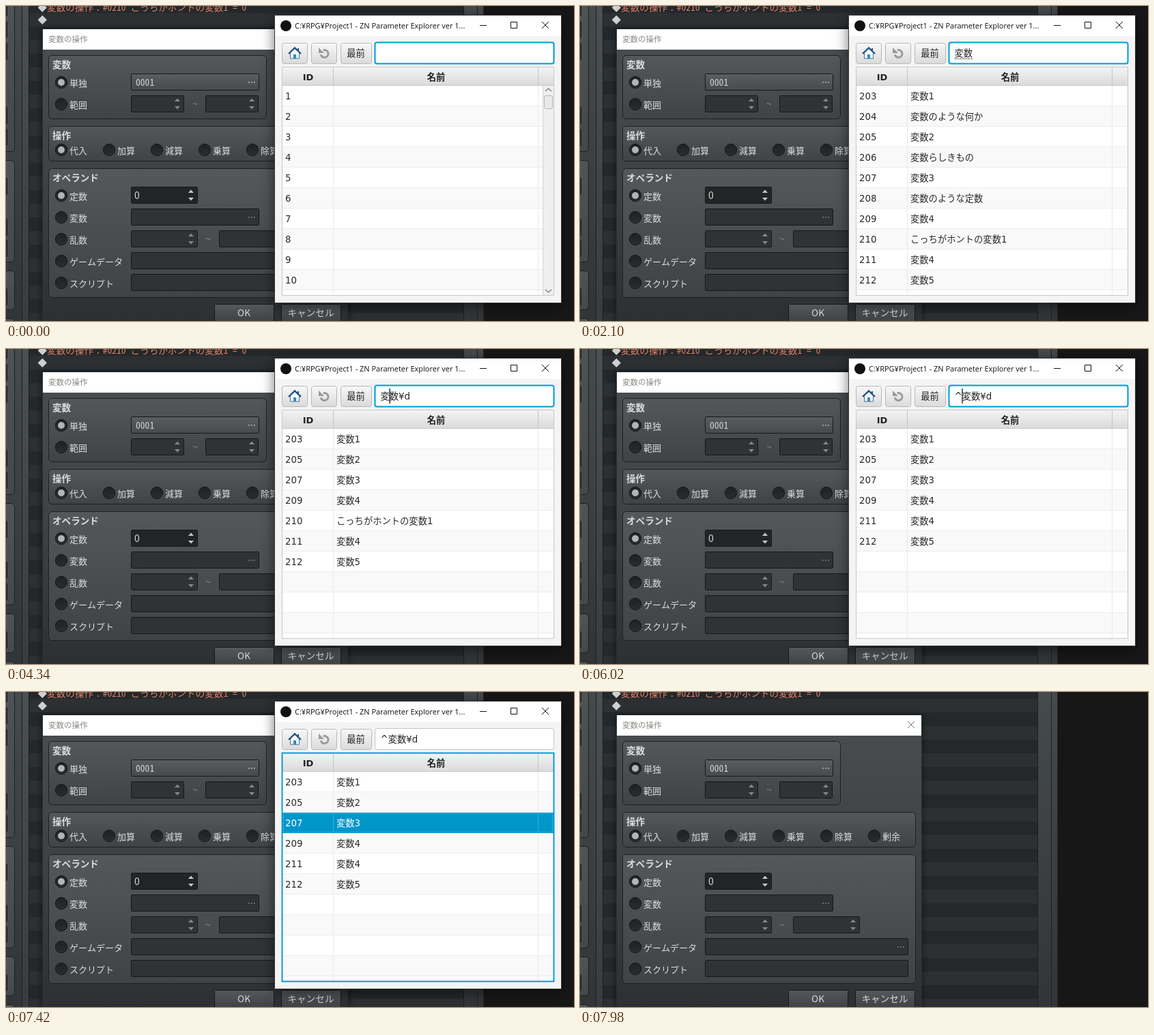
An HTML page with a canvas for the animation above (8 s loop, 832x462 px).

```html
<!DOCTYPE html>
<html lang="ja">
<head>
<meta charset="utf-8">
<style>
html, body { margin: 0; width: 100%; height: 100%; overflow: hidden; background: #171717; }
canvas { display: block; }
</style>
</head>
<body>
<canvas id="stage" width="832" height="462"></canvas>
<script>
const c = document.getElementById('stage').getContext('2d');
const LOOP = 8000;
const CJK = '"Noto Sans CJK JP", sans-serif';
const UI = '"DejaVu Sans", ' + CJK;
const MONO = '"Noto Sans Mono CJK JP", "Noto Sans CJK JP", monospace';
const BLUE = '#039ed3';

// [start, field text, caret index or -1 when hidden]
const typing = [
  [0, '', -1], [140, '', 0], [560, '', -1], [700, '', 0],
  [980, 'へ', 1], [1120, 'へｎ', 2], [1540, 'へｎ', -1],
  [1820, 'へんす', 3], [1960, 'へんすう', 4], [2100, '変数', -1],
  [2380, '変数', 2], [2940, '変数', -1], [3360, '変数', 2],
  [3640, '変数¥', 3], [3780, '変数¥d', 4], [4200, '変数¥d', 3],
  [4340, '変数¥d', 1], [4480, '変数¥d', 0], [4900, '変数¥d', -1],
  [5180, '^変数¥d', 1], [5600, '^変数¥d', -1], [6020, '^変数¥d', 1],
  [6300, '^変数¥d', -1]
];
// [start, focused part, selected row]
const focusing = [
  [0, 'field', -1], [6300, 'table', -1], [6580, 'home', -1],
  [7140, 'table', -1], [7280, 'table', 1], [7420, 'table', 2], [7560, 'table', 5]
];
const names = ['変数1', '変数のような何か', '変数2', '変数らしきもの', '変数3',
  '変数のような定数', '変数4', 'こっちがホントの変数1', '変数4', '変数5'];

const at = (list, t) => list.filter(s => s[0] <= t).pop();

function search(query) {
  if (!query) return names.map((_, i) => [i + 1, '']);
  try {
    const re = new RegExp(query.replace('¥', '\\'));
    return names.map((n, i) => [203 + i, n]).filter(r => re.test(r[1]));
  } catch {
    return [];
  }
}

function grad(y0, y1, ...colors) {
  const g = c.createLinearGradient(0, y0, 0, y1);
  colors.forEach((k, i) => g.addColorStop(i / (colors.length - 1), k));
  return g;
}
function rect(x, y, w, h, fill) {
  c.fillStyle = fill;
  c.fillRect(x, y, w, h);
}
function box(x, y, w, h, r, fill, stroke, width = 1) {
  c.beginPath();
  c.roundRect(x + .5, y + .5, w - 1, h - 1, r);
  if (fill) { c.fillStyle = fill; c.fill(); }
  if (stroke) { c.strokeStyle = stroke; c.lineWidth = width; c.stroke(); }
}
function disc(x, y, r, fill, stroke) {
  c.beginPath();
  c.arc(x, y, r, 0, 7);
  c.fillStyle = fill;
  c.fill();
  if (stroke) { c.strokeStyle = stroke; c.lineWidth = 1; c.stroke(); }
}
function line(color, width, ...p) {
  c.beginPath();
  for (let i = 0; i < p.length; i += 2) c.lineTo(p[i], p[i + 1]);
  c.strokeStyle = color;
  c.lineWidth = width;
  c.stroke();
}
function poly(fill, ...p) {
  c.beginPath();
  for (let i = 0; i < p.length; i += 2) c.lineTo(p[i], p[i + 1]);
  c.fillStyle = fill;
  c.fill();
}
// y is the visual middle of the glyphs
function text(s, x, y, size, color, { font = CJK, weight = 400, align = 'left' } = {}) {
  c.font = `${weight} ${size}px ${font}`;
  c.textAlign = align;
  c.fillStyle = color;
  c.fillText(s, x, y + size * .37);
}

function editor() {
  rect(0, 0, 832, 462, '#171717');
  rect(0, 0, 700, 462, grad(0, 462, '#454a4c', '#3c4042', '#313537'));
  for (const [y, h] of [[-20, 234], [226, 150], [388, 58], [458, 30]])
    box(-10, y, 23, h, 5, grad(y, y + h, '#505456', '#44484a'), '#1c1f21');
  for (const y of [-10, 22, 54, 148, 180, 252, 312, 343, 414])
    box(-10, y, 12, 25, 1, '#33373a', '#17191a');
  rect(23, 0, 1, 462, '#1d2021');
  rect(24, 0, 9, 462, grad(0, 462, '#4b5052', '#383c3e'));
  rect(33, 0, 638, 462, '#1b1e20');
  for (let i = 0; i < 24; i++)
    rect(34, i * 20 - 10, 636, 20, i % 2 ? '#2c3032' : '#24282a');
  rect(690, 0, 1, 462, '#1d2021');
  rect(699, 0, 1, 462, '#222526');
  text('◆', 46.5, 2, 13.6, '#d0d0d0', { font: MONO });
  text('変数の操作：#0210 こっちがホントの変数1 = 0', 60.1, 2, 13.6, '#e0806a', { font: MONO });
  text('◆', 46.5, 20, 13.6, '#d0d0d0', { font: MONO });
}

function group(y, w, h, title) {
  box(62, y, w, h, 5, grad(y, y + h, '#54585a', '#3f4345'), '#1d2021');
  text(title, 68, y + 14, 13.6, '#dcdcdc', { weight: 700 });
}
function radio(x, y, label, on) {
  disc(x, y, 8.7, grad(y - 9, y + 9, '#1e2123', '#2b2e30'), '#17191a');
  if (on) disc(x, y, 5, '#b4b4b4');
  text(label, x + 12, y + 1, 13, '#dcdcdc', { weight: 500 });
}
function entry(x, y, w, kind, on) {
  const fill = !on ? '#2f3335' : kind === 'dots' ? grad(y, y + 25, '#5a5e60', '#464a4c') : '#222425';
  box(x, y, w, 25, 1, fill, '#161819');
  const color = on ? '#c8c8c8' : '#85888a', r = x + w;
  if (kind === 'dots') for (const d of [16, 12, 8]) rect(r - d, y + 12, 1.6, 1.6, color);
  if (kind === 'spin') {
    poly(color, r - 14, y + 9, r - 10, y + 4.5, r - 6, y + 9);
    poly(color, r - 14, y + 16, r - 10, y + 20.5, r - 6, y + 16);
  }
}
function dialog() {
  c.save();
  c.shadowColor = 'rgba(0,0,0,.5)';
  c.shadowBlur = 10;
  rect(53, 34, 448, 440, '#2a2d2f');
  c.restore();
  rect(54, 64, 446, 400, grad(64, 462, '#484c4e', '#3d4143', '#2d3032'));
  rect(54, 34, 446, 30, '#fff');
  text('変数の操作', 62, 49, 11.5, '#858a82', { weight: 300 });
  line('#777', 1, 480, 43, 490, 53);
  line('#777', 1, 490, 43, 480, 53);

  group(72, 320, 94, '変数');
  radio(81, 112, '単独', true);
  radio(81, 144, '範囲');
  entry(183, 99, 188, 'dots', true);
  text('0001', 190, 112, 13.6, '#d8d8d8', { font: MONO });
  entry(183, 131, 78, 'spin');
  entry(292, 131, 78, 'spin');
  text('~', 277, 144, 14, '#85888a', { align: 'center' });

  group(176, 430, 52, '操作');
  ['代入', '加算', '減算', '乗算', '除算', '剰余'].forEach((s, i) => radio(81 + 70 * i, 211, s, !i));

  group(238, 430, 190, 'オペランド');
  ['定数', '変数', '乱数', 'ゲームデータ', 'スクリプト'].forEach((s, i) => radio(81, 278 + 32 * i, s, !i));
  entry(183, 265, 98, 'spin', true);
  text('0', 188, 278, 14, '#dcdcdc');
  entry(183, 297, 188, 'dots');
  entry(183, 329, 98, 'spin');
  entry(312, 329, 98, 'spin');
  text('~', 296, 342, 14, '#85888a', { align: 'center' });
  entry(183, 361, 298, 'dots');
  entry(183, 393, 298);

  for (const [x, s] of [[305, 'OK'], [403, 'キャンセル']]) {
    box(x, 437, 88, 27, 1, grad(437, 464, '#55595b', '#3d4143'), '#161819');
    text(s, x + 43.5, 450, 13.6, '#d8d8d8', { align: 'center' });
  }
}

function button(x, w, focused) {
  if (focused) box(x - 1, 53, w + 2, 33, 3, BLUE);
  box(x, 54, w, 31, 3, grad(54, 85, '#f8f8f8', '#dadada'), focused ? BLUE : '#b8b8b8');
}
function toolbar(focus) {
  button(404, 38, focus === 'home');
  poly('#f4f8fb', 417, 69, 423, 63, 429, 69, 429, 77, 417, 77);
  line('#4a6e90', 1, 416.5, 69, 416.5, 77, 429.5, 77, 429.5, 69);
  rect(421, 71, 4, 6, '#2f8bc4');
  rect(427, 62, 2, 4, '#24527c');
  line('#24527c', 2.4, 414, 70, 423, 61.5, 432, 70);

  button(447, 38);
  c.beginPath();
  c.arc(466.5, 70, 5.5, -1.9, 2.9);
  c.strokeStyle = '#9a9a9a';
  c.lineWidth = 3;
  c.stroke();
  poly('#9a9a9a', 458, 61, 458, 69, 466, 69);

  button(490, 46);
  text('最前', 512.5, 69, 13.3, '#222', { align: 'center' });
}

function field(value, caret, focused, composing) {
  if (focused) {
    box(538.5, 51.5, 266, 35, 4, '#c9ecf8');
    box(540, 53, 263, 32, 3, '#fff', BLUE, 2);
  } else {
    box(540, 53, 263, 32, 3, '#fff', '#c4c4c4');
  }
  const x = 548.5;
  text(value, x, 69, 13.3, '#222', { font: UI });
  if (composing) {
    c.setLineDash([3, 1]);
    line('#555', 1, x, 77.5, x + c.measureText(value).width, 77.5);
    c.setLineDash([]);
  }
  if (caret >= 0) rect(x + c.measureText(value.slice(0, caret)).width - .3, 58, 1.3, 22, '#111');
}

function scrollbar() {
  rect(786, 117, 16, 307, '#efefef');
  rect(786, 117, 1, 307, '#d4d4d4');
  box(788, 131, 13, 20, 2, '#e9e9e9', '#b4b4b4');
  line('#777', 1.2, 790, 125, 794.5, 121, 799, 125);
  line('#777', 1.2, 790, 416, 794.5, 420, 799, 416);
}
function table(rows, focused, selected, scroll, trail) {
  box(404, 89, 399, 336, 0, '#fff', '#c8c8c8');
  rect(405, 90, 397, 27, grad(90, 117, '#f3f3f3', '#dadada'));
  rect(405, 116, 397, 1, '#c8c8c8');
  for (const x of [479, 779]) rect(x, 90, 1, 27, '#c4c4c4');
  text('ID', 442.5, 104, 13, '#222', { font: UI, weight: 700, align: 'center' });
  text('名前', 630, 104, 13.3, '#222', { weight: 700, align: 'center' });

  if (!rows.length)
    text('表には中身がありません', 603.5, 271, 13.3, '#222', { align: 'center' });
  else for (let i = 0; i < 11; i++) {
    const y = 117 + 30 * i, h = Math.min(30, 424 - y), on = i === selected;
    rect(405, y, 397, h, on ? '#0096c9' : i % 2 ? '#f9f9f9' : '#fff');
    if (!on && h === 30) rect(405, y + 29, 397, 1, '#ededed');
    for (const x of [479, 779]) rect(x, y, 1, h, on ? '#35b0da' : '#e9e9e9');
    if (on) box(406, y + 1, 395, 28, 0, null, '#2aa9d6');
    if (i >= rows.length) continue;
    const color = on ? '#fff' : trail && i === 2 ? '#2a5f94' : '#2a2a2a';
    text(rows[i][0], 409, y + 15, 13.3, color, { font: UI });
    text(rows[i][1], 484, y + 15, 13.3, color, { font: UI });
  }
  if (scroll) scrollbar();
  if (focused) {
    if (selected < 0) box(406, 118, 395, 29, 0, null, '#45a9c9');
    box(404, 89, 399, 336, 0, null, BLUE, 2);
  }
}

function searcher(t) {
  const [, value, caret] = at(typing, t);
  const [, focus, selected] = at(focusing, t);
  const composing = t >= 980 && t < 2380;
  c.save();
  c.shadowColor = 'rgba(0,0,0,.55)';
  c.shadowBlur = 18;
  c.shadowOffsetY = 4;
  rect(393, 13, 421, 423, '#3a3a3a');
  c.restore();
  rect(394, 14, 419, 421, '#f4f4f4');
  rect(394, 14, 419, 30, '#fff');
  disc(410, 29, 8, '#111');
  text('C:¥RPG¥Project1 - ZN Parameter Explorer ver 1...', 423, 29, 11, '#111',
    { font: '"Open Sans", sans-serif' });
  line('#111', 1, 694, 28.5, 704, 28.5);
  box(739, 23, 10, 10, 0, null, '#111');
  line('#111', 1, 785, 23, 795, 33);
  line('#111', 1, 795, 23, 785, 33);

  toolbar(focus);
  field(value, caret, focus === 'field', composing);
  table(search(value), focus === 'table', selected, !value, t >= 7560);
  if (composing && t < 2100) {
    box(387, 435, 115, 40, 0, '#fff', '#9a9a9a');
    text('変数', 394, 448, 14.8, '#111');
  }
}

function draw(now) {
  const t = now % LOOP;
  editor();
  dialog();
  if (t < 7980) searcher(t);
  requestAnimationFrame(draw);
}
draw(0);
</script>
</body>
</html>
```
